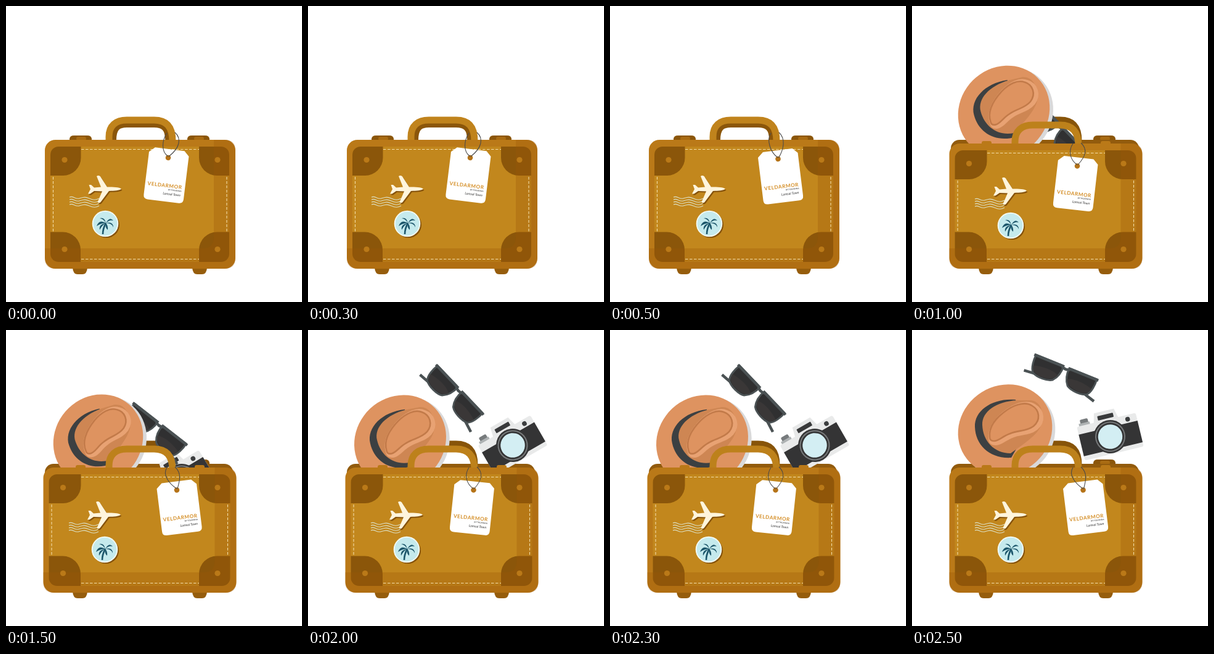
Recreate the animation shown at these times as an HTML page. Size 480 px wide and 480 px high, loop 3000 ms.

```html
<!DOCTYPE html>
<html lang="en">
<head>
<meta charset="utf-8">
<title>Packing a suitcase</title>
<style>
html, body { margin: 0; width: 100%; height: 100%; overflow: hidden; background: #fff; }
svg { display: block; width: 100vw; height: 100vh; }
text { font-family: Lato, sans-serif; }
</style>
</head>
<body>
<svg id="stage" viewBox="0 0 480 480"></svg>
<script>
const DARK = '#8b560a', EDGE = '#ba7918', FACE = '#c2871d', PEACH = '#de9360';
const stage = document.getElementById('stage');

const box = (x1, y1, x2, y2, fill, rx = 0) =>
  `<rect x="${x1}" y="${y1}" width="${x2 - x1}" height="${y2 - y1}" rx="${rx}" fill="${fill}"/>`;
const disc = (x, y, r, fill) => `<circle cx="${x}" cy="${y}" r="${r}" fill="${fill}"/>`;
const shape = (d, fill, more = '') => `<path d="${d}" fill="${fill}" ${more}/>`;
const line = (d, color, width, more = '') =>
  `<path d="${d}" fill="none" stroke="${color}" stroke-width="${width}" ${more}/>`;
const place = (art, x = 0, y = 0, turn = 0, scale = 1) =>
  `<g transform="translate(${x} ${y}) rotate(${turn}) scale(${scale})">${art}</g>`;

const handle = color => line('M167 219V212C167 194 178 185 196 185H240C260 185 270 196 270 219', color, 11);

const latches = [121, 312].map(x =>
  shape(`M${x - 18} 218V215Q${x - 17} 210 ${x - 11} 210H${x + 11}Q${x + 17} 210 ${x + 18} 215V218Z`, DARK) +
  box(x - 7, 212, x + 9, 218, '#a96b12', 3)).join('');

const feet = [120, 314].map(x =>
  shape(`M${x - 12} 425H${x + 12}Q${x + 11} 435 ${x + 4} 435H${x - 4}Q${x - 11} 435 ${x - 12} 425Z`, '#965d0c')).join('');

function caseFront(x1, x2, top, id) {
  const l = x1 + 9, r = x2 - 10, t = top + 11, b = 415, s = x2 - 35;
  const cornerTop = top + 58;
  const corners =
    box(l - 30, t - 30, 121.5, cornerTop, DARK, 29) + box(313, t - 30, r + 30, cornerTop, DARK, 29) +
    box(l - 30, 366.5, 121, b + 30, DARK, 29) + box(313, 366.5, r + 30, b + 30, DARK, 29);
  const rivets = [x1 + 32, 343].map(x => disc(x, top + 32.5, 4.6, EDGE) + disc(x, 394.5, 4.6, EDGE)).join('');
  return `<clipPath id="${id}">${box(l, t, r, b, '#000', 13)}</clipPath>` +
    box(x1, top, x2, 426, EDGE, 17) +
    box(l, t, r, b, FACE, 13) +
    `<g clip-path="url(#${id})">${corners}</g>` +
    shape(`M${s} ${top}H${x2 - 17}Q${x2} ${top} ${x2} ${top + 17}V409Q${x2} 426 ${x2 - 17} 426H${x1 + 17}` +
      `Q${x1} 426 ${x1} 409V393H${s - 18}Q${s} 393 ${s} 375Z`, '#9c5809', 'opacity=".32"') +
    line(`M122 ${top + 15.5}H313M122 410.5H313M${x1 + 13.5} ${cornerTop + 2}V366M${x2 - 14} ${cornerTop + 2}V366`,
      '#f3dda8', 1.1, 'stroke-dasharray="4.500 2.500"') + rivets;
}

const wave = y => `M103 ${y}c6 -3 9 4 16 2s9 -3 16 0s10 3 16 0`;
const planePath = 'M187 296.5C183 293.500 175 293.500 164 293.500L153 276.500Q150 274 147 276L154 293.500L143 294.500' +
  'L138 290H134.500L137 297L133 304.500H136.500L143 300L156 300.500L148.500 318Q151 320.500 153.500 318' +
  'L167 300C176 299.500 184 299.500 187 296.500Z';
const palm = line('M157 368Q157 359 162 350', '#1c566b', 2.6) +
  shape('M162 350Q151 343 147 355Q154 350 162 350Q150 352 152 361Q156 353 162 350Q160 357 165 361Q166 355 162 350' +
    'Q172 350 174 357Q174 347 162 350Q168 344 174 346Q168 339 162 350Q160 340 152 342Q158 343 162 350Z', '#1c566b');
const stickers =
  line([310, 314, 318, 322].map(wave).join(''), '#dde0c4', 1.1) +
  place(shape(planePath, '#85520b'), 1.5, 2) + shape(planePath, '#fff5dc') +
  disc(163, 355, 21, '#85520b') + disc(161, 353, 21.3, '#f5fbf4') + disc(161, 353, 19.5, '#c5eaed') +
  place(palm, 0, 2);

const closedCase = feet + latches + line('M175 217C175 198 182 193 196 193H240C255 193 262 199 262 217', DARK, 8) +
  handle('#c0831c') + caseFront(63, 372, 217, 'closed') + stickers;

const openBack = latches + handle('#875409') + box(63, 217, 368, 300, '#925b0d', 14);
const openFront = feet + place(handle('#bd811b'), 0, 8) +
  [121, 314].map(x => box(x - 8, 219, x + 8, 226, EDGE, 3)).join('') +
  caseFront(60.5, 373.5, 223, 'open') + place(stickers, -1, 3);

const brim = fill => `<ellipse rx="78" ry="72" transform="rotate(-32)" fill="${fill}"/>`;
const dent = 'M-25 12C-27 -6 -15 -20 4 -33C18 -42 34 -46 44 -39C56 -32 58 -16 46 -6' +
  'C34 3 22 0 8 6C-4 10 -10 18 -18 18C-23 18 -25 16 -25 12Z';
const hat = place(brim('#d9d9da'), 5, 4) + brim(PEACH) +
  shape('M17 -49C-20 -52 -50 -32 -49 -5C-48 25 -25 47 10 45L30 10Z', '#3c4042') +
  shape('M19 -48C-14 -46 -38 -30 -37 -8C-36 18 -18 38 9 38C25 26 55 8 59 -10C64 -32 56 -46 42 -48Z', '#ce8653') +
  place(line(dent, '#e8a273', 10), 3, 2) +
  shape(dent, PEACH, 'stroke="#c27a49" stroke-width="2.600"');

const lens = 'M5 1H53C54 10 53 24 47 30C38 35 20 34 13 29C7 22 4 12 5 1Z';
const halfGlasses = shape(lens, '#303031', 'stroke="#4b5254" stroke-width="3"') +
  shape('M8 19C20 13 38 15 51 19C49 27 45 30 34 31C20 31 11 27 8 19Z', '#3a3737');
const glasses =
  line('M-41 30L-62 32M41 30L62 36', '#4b5254', 4.5) +
  halfGlasses + `<g transform="scale(-1 1)">${halfGlasses}</g>` +
  line('M-56 2H-8Q0 8 8 2H56', '#4b5254', 4.5);

const camera =
  box(-42, -38, -29, -26, '#777b7d', 2) + box(-45, -32, -27, -26, '#aeb2b3') +
  shape('M-21 -27L-17 -43H16L20 -27Z', '#e7e8e8') + box(-13, -37, 13, -30, '#38393a', 1) +
  box(-49, -28, 49, 28, '#e9eaea', 3) + box(-49, -15, 49, 21, '#343435') +
  disc(34, -21, 3.8, '#3c3e3f') +
  disc(0, 0, 27, '#343435') + disc(0, 0, 24.5, '#77797a') + disc(0, 0, 22.5, '#343435') + disc(0, 0, 19.8, '#d3eef3');

const tag =
  shape('M-23 -14H25L33 -6V64Q33 71 26 71H-25Q-32 71 -32 64V-6Z', '#fff') +
  disc(0, 0, 4.3, '#b57318') +
  '<text x="-28" y="48" font-size="8.200" font-weight="700" letter-spacing=".55" fill="#d58f28">VELDARMOR</text>' +
  '<text x="28" y="52.500" font-size="3.200" font-weight="700" text-anchor="end" fill="#555">BY TOLVENNA</text>' +
  '<text x="27" y="60" font-size="5.400" font-style="italic" text-anchor="end" fill="#333">Lomsai Town</text>';

function hangingTag(x, y, turn, knot) {
  const cord = `M${x} ${y - 2}C${x - 12} ${y - 10} 253 ${knot + 12} 261 ${knot}` +
    `M274 ${knot - 1}C285 ${knot + 9} 282 ${y - 16} ${x + 1} ${y - 2}`;
  return place(tag, x, y, turn) + line(cord, '#4a4a4a', 1.1);
}

// Each item: x, y, rotation, scale. Poses without a hat show the closed case.
const poses = [
  { tag: [263, 246, 7] },
  { tag: [272.5, 248, -7] },
  { tag: [268, 259.5, 6.5], hat: [149, 171, -13, 0.99], glasses: [243, 193, 46] },
  { tag: [277, 259.5, -7], hat: [149.5, 178, -17, 0.975], glasses: [251, 151, 38], camera: [285, 244, -31] },
  { tag: [268.5, 259.5, 6], hat: [149.5, 179.5, -11, 0.99], glasses: [247.5, 95.5, 46.5], camera: [332, 187, -30] },
  { tag: [277.5, 259.5, -7], hat: [151, 162, 0, 1], glasses: [251, 59, 22], camera: [321.5, 173, -13.5] },
];

const pictures = poses.map(p => {
  if (!p.hat) return closedCase + hangingTag(...p.tag, 206);
  return openBack +
    (p.camera ? place(camera, ...p.camera) : '') +
    place(glasses, ...p.glasses) + place(hat, ...p.hat) +
    openFront + hangingTag(...p.tag, 223);
});

let shown = -1;
function draw() {
  const step = Math.floor(performance.now() % 3000 / 500);
  if (step !== shown) stage.innerHTML = pictures[shown = step];
  requestAnimationFrame(draw);
}
draw();
</script>
</body>
</html>
```
